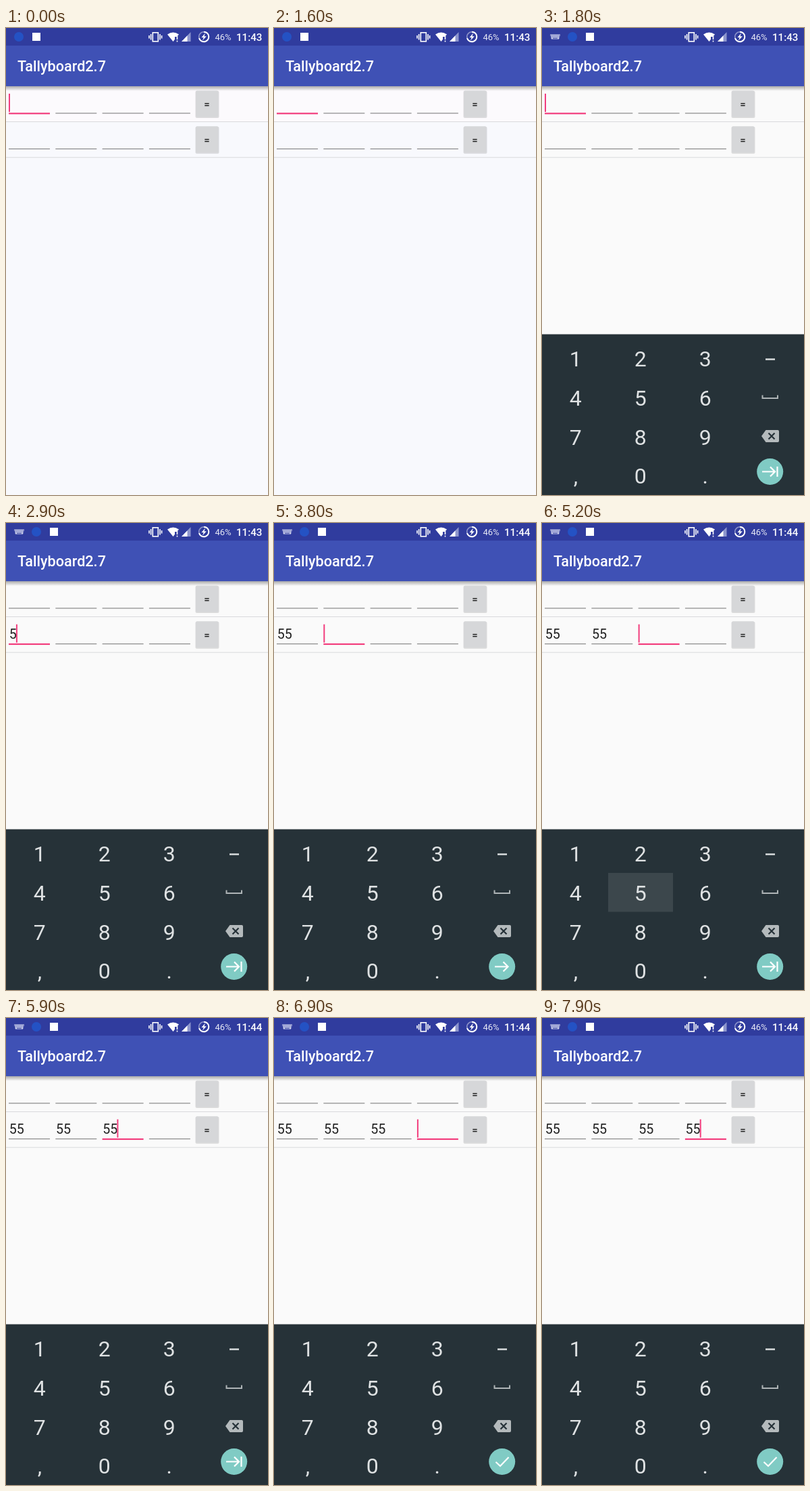
An HTML page that plays this animation: 388x690 px, repeating every 8 s.

```html
<!DOCTYPE html>
<html lang="en">
<head>
<meta charset="utf-8">
<title>Tallyboard</title>
<style>
  html, body { margin: 0; width: 100%; height: 100%; overflow: hidden; background: #fafafa; }
  svg { display: block; width: 388px; height: 690px; font-family: Roboto, sans-serif; }
  .line { fill: none; stroke: #fff; stroke-width: 1.6; }
  .keys text { font-size: 32px; fill: #dfe2e3; text-anchor: middle; }
  .rule { fill: #808080; }
  .rule.active, #cursor { fill: #f23d7d; }
  .entry { font-size: 19.6px; fill: #212121; }
</style>
</head>
<body>
<svg viewBox="0 0 388 690">
  <defs>
    <linearGradient id="shade" x2="0" y2="1">
      <stop stop-color="#000" stop-opacity=".32"/>
      <stop offset="1" stop-color="#000" stop-opacity="0"/>
    </linearGradient>
  </defs>
  <rect id="page" width="388" height="690"/>
  <rect id="warm" y="86" width="388" height="52" fill="#fcfafd"/>
  <rect y="86" width="388" height="7" fill="url(#shade)"/>
  <g id="rows"></g>
  <rect id="cursor" width="2" height="27"/>

  <rect width="388" height="27" fill="#303c9e"/>
  <rect y="26" width="388" height="60" fill="#3f51b5"/>
  <text x="17" y="64" font-size="21.6" font-weight="500" fill="#fff">Tallyboard2.7</text>

  <g id="notices">
    <circle cx="19" cy="13" r="7" fill="#2452c4"/>
    <rect x="39" y="7" width="12" height="12" fill="#fff"/>
  </g>
  <g id="imeIcon">
    <path d="M12 9.5H27L25 16.5H14Z" fill="#c9cdea"/>
    <path d="M13 11.2H26M13 13.2H26" stroke="#303c9e" stroke-dasharray="1 1"/>
    <path d="M16 15.2H23" stroke="#303c9e"/>
  </g>

  <g class="line">
    <rect x="217.3" y="6.8" width="8" height="13"/>
    <path d="M214.6 9V17.5M228 9V17.5M212 11V15.5M230.6 11V15.5"/>
  </g>
  <path d="M239 9.5Q247.500 3.5 256 9.5L253 13H250V16.8L247.500 20Z" fill="#fff"/>
  <path d="M253.500 12V17M253.500 18.500V20.500" class="line"/>
  <path d="M260 20L273.500 6V20Z" fill="#8d96cd"/>
  <path d="M260 20L268.500 11.2V20Z" fill="#fff"/>
  <circle cx="293" cy="13" r="7.3" class="line" stroke-opacity=".45"/>
  <path d="M293 5.7A7.3 7.3 0 1 1 286 15" class="line" style="stroke-width:2"/>
  <path d="M295 7.5L289.500 14H292.600L291 18.500L296.800 12.2H293.500Z" fill="#fff"/>
  <text x="309.500" y="18" font-size="13" fill="#e6e8f5">46%</text>
  <text id="clock" x="341" y="19" font-size="15.1" font-weight="500" fill="#fff"></text>

  <g id="keyboard" class="keys">
    <rect y="452.500" width="388" height="238" fill="#263238"/>
    <rect id="pressed" x="98" y="517" width="96" height="57.500" fill="#3c474c"/>
    <g id="digits"></g>
    <path d="M331 489.500H345" stroke="#dfe2e3" stroke-width="2.4"/>
    <path d="M326.500 542.500V547H349V542.500" fill="none" stroke="#aeb4b6" stroke-width="2"/>
    <path d="M325 603L331.500 594H349Q351 594 351 596V610Q351 612 349 612H331.500Z" fill="#b4babc"/>
    <path d="M335.500 598.500L344.500 607.500M344.500 598.500L335.500 607.500" stroke="#263238" stroke-width="2.2"/>
    <circle id="enter" cx="337.700" cy="655.500" r="19.500"/>
    <path id="enterIcon" class="line" style="stroke-width:2.2"/>
  </g>
</svg>
<script>
const $ = id => document.getElementById(id);
const DURATION = 8000, FRAME = 100, KEYBOARD_AT = 1700, CLOCK_AT = 3000, PRESS = 150;
const fieldX = col => 4 + col * 69.3;
const rowY = row => 86 + row * 52.7;

// time, focused row, focused column, digits typed there
const steps = [
  [0, 0, 0, 0], [KEYBOARD_AT, 0, 0, 0], [2400, 1, 0, 0],
  [2800, 1, 0, 1], [3100, 1, 0, 2], [3600, 1, 1, 0],
  [4100, 1, 1, 1], [4400, 1, 1, 2], [4800, 1, 2, 0],
  [5300, 1, 2, 1], [5700, 1, 2, 2], [6500, 1, 3, 0],
  [7300, 1, 3, 1], [7600, 1, 3, 2]
];

const arrow = 'M327 655.5H346M339.5 648.5L346.5 655.5L339.5 662.5';
const tab = 'M326 655.5H344M338 648.5L345 655.5L338 662.5M348.5 648V663';
const check = 'M328.5 656L335 662L347.5 649';
const enterIcons = [tab, arrow, tab, check];

$('rows').innerHTML = [0, 1].map(row => {
  const y = rowY(row);
  const fields = [0, 1, 2, 3].map(col => `
    <rect id="rule${row}${col}" class="rule" x="${fieldX(col)}" width="61"/>
    <text id="entry${row}${col}" class="entry" x="${fieldX(col) + .7}" y="${y + 32.2}"></text>`).join('');
  return `${fields}
    <rect y="${y + 52}" width="388" height="1" fill="#d9dadc"/>
    <rect x="280.5" y="${y + 7}" width="35" height="40" rx="2" fill="#000" opacity=".12"/>
    <rect x="281" y="${y + 6.5}" width="33.5" height="39" rx="2" fill="#d6d7d9"/>
    <text x="297.5" y="${y + 32}" font-size="15" font-weight="500" fill="#1c1c1c" text-anchor="middle">=</text>`;
}).join('');

$('digits').innerHTML = [...'123456789,0.'].map((key, i) =>
  `<text x="${49.8 + i % 3 * 96}" y="${500.3 + Math.floor(i / 3) * 57.7}">${key}</text>`).join('');

function show(id, visible) {
  $(id).style.display = visible ? '' : 'none';
}

function draw(time) {
  const past = steps.filter(step => step[0] <= time);
  const [since, row, col, count] = past[past.length - 1];
  const typing = time >= KEYBOARD_AT;

  for (let r = 0; r < 2; r++) for (let c = 0; c < 4; c++) {
    const active = r === row && c === col;
    const rule = $(`rule${r}${c}`);
    rule.classList.toggle('active', active);
    rule.setAttribute('y', rowY(r) + (active ? 39.2 : 39.4));
    rule.setAttribute('height', active ? 2.2 : 1.1);
    const digits = active ? count : r === 1 && row === 1 && c < col ? 2 : 0;
    $(`entry${r}${c}`).textContent = '5'.repeat(digits);
  }

  $('cursor').setAttribute('x', fieldX(col) + count * 10.9);
  $('cursor').setAttribute('y', rowY(row) + 11);
  show('cursor', (time - since) % 1000 < 500);

  $('page').setAttribute('fill', typing ? '#fafafa' : '#f8f9fd');
  show('warm', !typing);
  show('imeIcon', typing);
  $('notices').setAttribute('transform', `translate(${typing ? 26 : 0})`);
  $('clock').textContent = time < CLOCK_AT ? '11:43' : '11:44';

  const rise = Math.min(1, Math.max(0, (time - KEYBOARD_AT + FRAME) / (2 * FRAME)));
  $('keyboard').setAttribute('transform', `translate(0 ${240 * (1 - rise) ** 2})`);
  show('pressed', steps.some(([at, , , n]) => n && time >= at - PRESS && time < at));
  $('enter').setAttribute('fill', time >= 6400 && time < 6600 ? '#9ad6d0' : '#80cbc4');
  $('enterIcon').setAttribute('d', enterIcons[col]);
}

const start = performance.now();
function tick() {
  const time = (performance.now() - start) % DURATION;
  draw(Math.floor(time / FRAME) * FRAME);
  requestAnimationFrame(tick);
}
tick();
</script>
</body>
</html>
```
